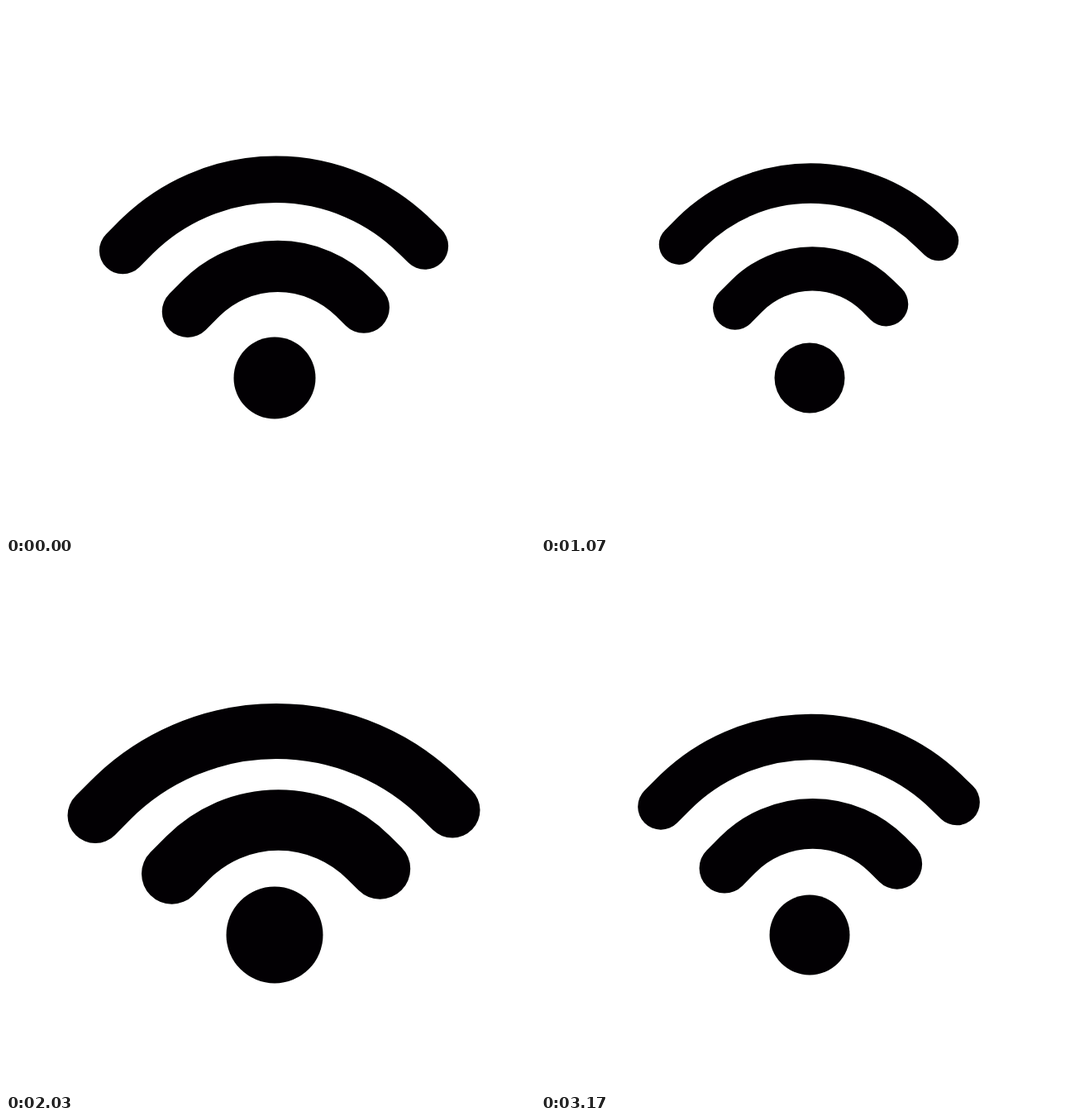
Recreate the animation shown at these times as an HTML page. Size 640 px wide and 640 px high, loop 3210 ms.

```html
<!DOCTYPE html>
<html lang="en">
<head>
<meta charset="utf-8">
<title>Wireless signal</title>
<style>
  html, body { margin: 0; width: 100%; height: 100%; overflow: hidden; background: #fff; }
  svg { display: block; width: 100vw; height: 100vh; }
  path { fill: none; stroke: #020003; stroke-linecap: round; }
  circle { fill: #020003; }
</style>
</head>
<body>
<svg viewBox="0 0 640 640">
  <path data-pivot="324 243.5" stroke-width="67"
        d="M108 305.5 L127 286.4 A283 283 0 0 1 527 286.4 L540 299"/>
  <path data-pivot="325 336.2" stroke-width="73.4"
        d="M200.7 376 L220.4 356.2 A154.3 154.3 0 0 1 438.6 356.2 L452.5 370"/>
  <circle data-pivot="325 450" cx="325" cy="450" r="58.5"/>
</svg>
<script>
  const LOOP = 3210, BEAT = 200, RADIUS = 58.5, MAX_RADIUS = 59.5;
  const ticks = [0, 30, 70, 130, 170]; // step starts within one beat
  const parts = [...document.querySelectorAll('[data-pivot]')].map(el => {
    const [x, y] = el.dataset.pivot.split(' ');
    return { el, x, y };
  });

  function stepAt(time) {
    const t = Math.min(time % LOOP, 16 * BEAT - 1);
    return Math.floor(t / BEAT) * ticks.length + ticks.filter(s => s <= t % BEAT).length - 1;
  }

  // Triangle wave over 40 steps, largest at step 10, one pixel of dot radius per step
  function scaleAt(step) {
    const shrink = Math.abs((step + 10) % 40 - 20);
    return (MAX_RADIUS - shrink) / RADIUS;
  }

  const start = performance.now();
  function draw() {
    const s = scaleAt(stepAt(performance.now() - start));
    for (const { el, x, y } of parts) {
      el.setAttribute('transform', `translate(${x} ${y}) scale(${s}) translate(${-x} ${-y})`);
    }
    requestAnimationFrame(draw);
  }
  draw();
</script>
</body>
</html>
```
